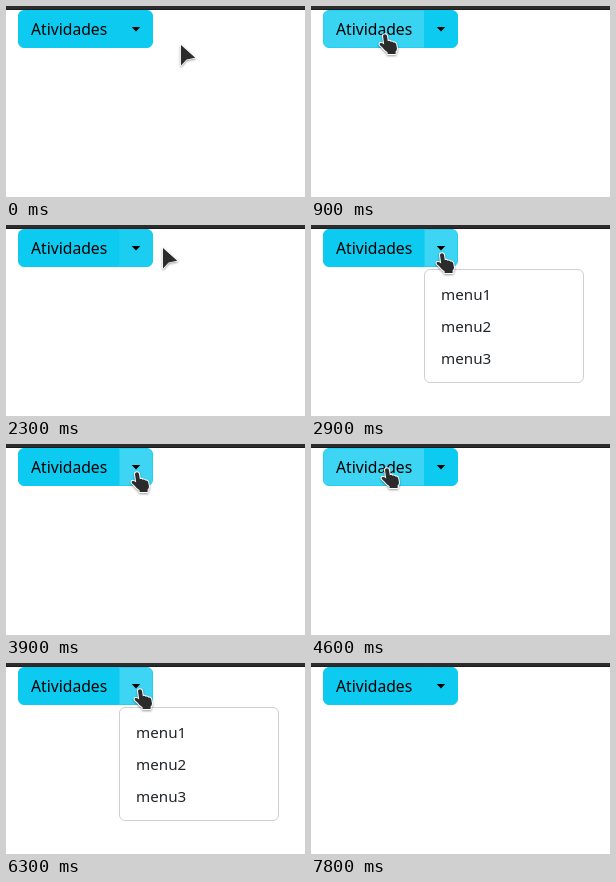
Animation of 299 by 191 pixels, one loop 9 s. Source, as an HTML page:

```html
<!DOCTYPE html>
<html lang="pt">
<head>
<meta charset="utf-8">
<title>Atividades</title>
<style>
  html, body { margin: 0; width: 100%; height: 100%; overflow: hidden; background: #fff; }
  svg { display: block; width: 299px; height: 191px; font-family: "Noto Sans", "Open Sans", sans-serif; }
  .pointer { fill: #2b2b2b; stroke: #fff; stroke-linejoin: round; paint-order: stroke; filter: drop-shadow(.5px 1px .8px rgba(0, 0, 0, .4)); }
</style>
</head>
<body>
<svg viewBox="0 0 299 191">
  <rect width="299" height="4" fill="#2c2c2c"/>
  <rect y="3" width="299" height="1" fill="#1c1c1e"/>
  <path id="main" d="M113.5 4.5H18a5.5 5.5 0 0 0-5.5 5.5v26a5.5 5.5 0 0 0 5.5 5.5h95.5z"/>
  <path id="toggle" d="M113.5 4.5H141a5.5 5.5 0 0 1 5.5 5.5v26a5.5 5.5 0 0 1-5.5 5.5h-27.5z"/>
  <text x="25" y="28.5" font-size="15.7">Atividades</text>
  <path d="M125.7 21h8.6l-4.3 4.4z"/>
  <g id="menu" fill="#212529" font-size="15.2">
    <rect x="113.5" y="44.5" width="159" height="113" rx="5.5" fill="#fff" stroke="#d0d0d0"/>
    <text x="130" y="75">menu1</text>
    <text x="130" y="107">menu2</text>
    <text x="130" y="139">menu3</text>
  </g>
  <path id="arrow" class="pointer" stroke-width="1.4" d="M0 0V20.5L5.6 14.4L14.2 12.8z"/>
  <path id="hand" class="pointer" stroke-width="2"
    d="M-2 2Q-2 .3 0 .3Q1.8 .3 2 2L2.8 7.2Q4.5 6.3 5.6 7.8Q7.4 7 8.3 8.6Q10.6 8 11.2 10.2L12 14.5Q12 16.5 10.6 17.6V20H2.6V18.2Q-.6 16.2-2.5 13.4L-5.2 11Q-6 9.6-4.6 9Q-3 8.6-.8 10.4z"/>
</svg>
<script>
const LOOP = 9000, STEP = 100, SPLIT = 113, FADE = 150;
const el = id => document.getElementById(id);
const [main, toggle, menu, arrow, hand] = ["main", "toggle", "menu", "arrow", "hand"].map(el);

// Pointer hot spot: time, x, y
const path = [
  [0, 175, 39], [250, 175, 39], [300, 172, 42], [500, 137, 33], [900, 74, 28],
  [1050, 74, 28], [1300, 136, 30], [1500, 132, 30], [1580, 116, 30], [1600, 95, 29],
  [1700, 92, 29], [2000, 130, 29], [2050, 130, 29], [2300, 157, 23], [2400, 155, 24],
  [2600, 131, 28], [3900, 131, 28], [4400, 76, 24], [4950, 76, 24], [5200, 131, 25],
  [5400, 98, 24], [5600, 80, 24], [5900, 132, 25], [6000, 134, 26], [7350, 134, 26],
  [7500, 128, 19], [7600, 117, 6], [7700, 98, -3], [7800, 90, -40], [LOOP, 90, -40]
];
const base = [13, 202, 240], lit = [56, 212, 242], pressed = [61, 213, 243], edge = [37, 207, 242];

const within = (t, a, b) => t >= a && t < b;
const mix = (a, b, k) => `rgb(${a.map((v, i) => Math.round(v + (b[i] - v) * k))})`;

function pointerAt(t) {
  const i = Math.max(1, path.findIndex(p => p[0] >= t));
  const [t0, x0, y0] = path[i - 1], [t1, x1, y1] = path[i];
  const k = Math.max(0, (t - t0) / (t1 - t0));
  return [x0 + (x1 - x0) * k, y0 + (y1 - y0) * k];
}

function partUnder([x, y]) {
  if (!within(x, 12, 147) || !within(y, 4, 42)) return null;
  return x < SPLIT ? main : toggle;
}

// Share of the fade window that the pointer spent over a part
function hover(part, t) {
  let n = 0;
  for (let d = 0; d < FADE; d += 10) if (partUnder(pointerAt(Math.max(0, t - d))) === part) n++;
  return n * 10 / FADE;
}

function paint(part, t, active) {
  const k = hover(part, t);
  part.setAttribute("fill", active ? mix(base, pressed, 1) : mix(base, lit, k));
  part.setAttribute("stroke", mix(base, edge, active ? 1 : k));
}

function draw(time) {
  const t = Math.floor(time % LOOP / STEP) * STEP;
  const pos = pointerAt(t), over = partUnder(pos);
  paint(main, t, within(t, 4600, 4800));
  paint(toggle, t, within(t, 2900, 4000) || within(t, 6300, 7200));
  const open = within(t, 2800, 3900) || within(t, 6200, 7100);
  menu.style.display = open ? "" : "none";
  for (const shape of [arrow, hand]) {
    shape.style.display = (shape === hand) === !!over ? "" : "none";
    shape.setAttribute("transform", `translate(${pos.map(Math.round)})`);
  }
}

const start = performance.now();
function tick() {
  draw(performance.now() - start);
  requestAnimationFrame(tick);
}
tick();
</script>
</body>
</html>
```
